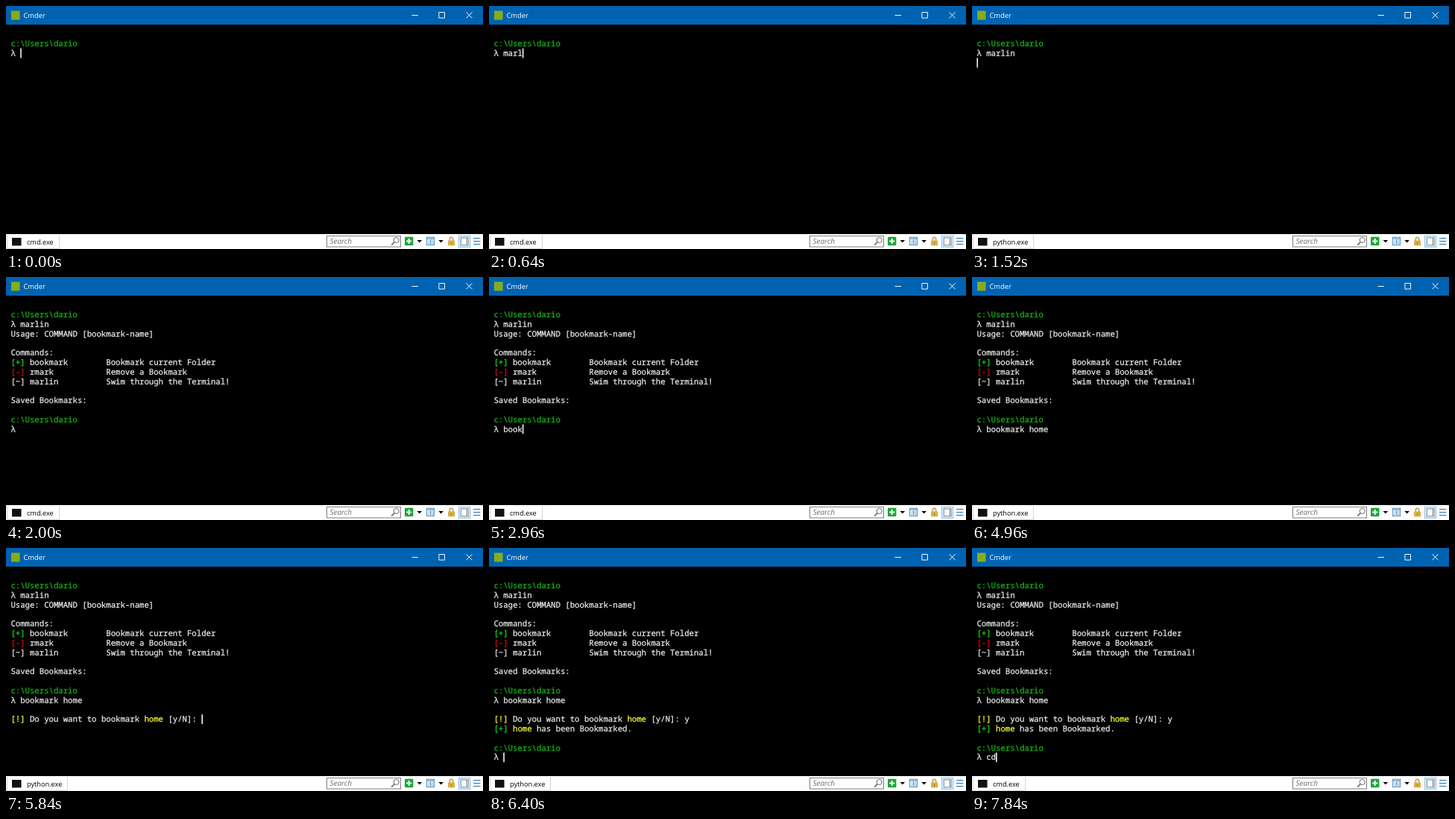
An HTML page for the animation above (8000 ms loop, 640 by 326 pixels).

```html
<!DOCTYPE html>
<html lang="en">
<head>
<meta charset="utf-8">
<title>Terminal bookmarks</title>
<style>
  html, body { margin: 0; width: 100%; height: 100%; overflow: hidden; background: #000; }
  svg { display: block; width: 100%; height: 100%; }
  text { white-space: pre; text-rendering: geometricPrecision; }
  .ui { font: 9.2px "Open Sans", "Noto Sans", sans-serif; }
  #rows { font: 10.667px "Noto Sans Mono", "DejaVu Sans Mono", monospace; color: #ececec; }
  #rows text, #rows tspan { fill: currentColor; stroke: currentColor; stroke-width: .25px; }
  .p { color: #14b814; }
  .g { color: #16e01c; }
  .r { color: #e00c0c; }
  .y { color: #ffff38; }
</style>
</head>
<body>
<svg viewBox="0 0 640 326" preserveAspectRatio="none">
  <defs>
    <linearGradient id="pane" x2="1" y2="1">
      <stop stop-color="#eaf4fc"/><stop offset="1" stop-color="#a9cdea"/>
    </linearGradient>
  </defs>
  <rect width="640" height="326"/>

  <!-- title bar -->
  <rect width="640" height="25" fill="#0063b1"/>
  <rect x="7" y="6.5" width="11.5" height="12" fill="#86ad1c"/>
  <text class="ui" x="23.4" y="16" fill="#fff" style="font-size:9.4px">Cmder</text>
  <path d="M544.5 12.5h8.5M580.9 8.5h7.6v7.6h-7.6zM617.5 8.3l8 8M625.5 8.3l-8 8" fill="none" stroke="#fff" stroke-width=".95"/>

  <!-- status bar -->
  <rect y="306" width="640" height="20" fill="#fff"/>
  <path id="edge" fill="none" stroke="#d6d6d6"/>
  <rect x="8" y="311" width="12.5" height="10.5" fill="#111"/>
  <text class="ui" id="tab" x="28" y="320" fill="#000"></text>

  <rect x="430.5" y="308.5" width="99" height="14.6" fill="#fff" stroke="#7c7c7c"/>
  <text class="ui" x="434.5" y="319.2" fill="#6e6e6e" style="font-style:italic;font-size:10px">Search</text>
  <g fill="none" stroke="#666">
    <circle cx="523.7" cy="314" r="3.6"/>
    <path d="M521.2 316.6l-4 4" stroke-width="1.5"/>
  </g>

  <rect x="535" y="309.8" width="11.4" height="11.4" rx="1" fill="#1ca637"/>
  <path d="M540.7 312v7M537.2 315.5h7" stroke="#fff" stroke-width="2"/>
  <path d="M551.5 314h6.6l-3.3 3.6zM580.3 314h6.6l-3.3 3.6z"/>
  <rect x="564.3" y="310.3" width="10.4" height="10.4" fill="url(#pane)" stroke="#5d92bd"/>
  <path d="M564 312h11M569.5 313.5v5" stroke="#5d92bd"/>
  <path d="M595.3 315v-2.4a2.2 2.4 0 0 1 4.4 0v2.4" fill="none" stroke="#bd9a4e" stroke-width="1.5"/>
  <rect x="593" y="314.6" width="9.2" height="7" rx=".8" fill="#d9b04a"/>
  <path d="M597.6 316.8v2.6" stroke="#8a6a1c"/>
  <rect x="607.3" y="308.3" width="15.6" height="15.2" fill="#d3eafa" stroke="#8cc6ec"/>
  <rect x="610.4" y="311" width="9.8" height="9.8" fill="#fff" stroke="#8a8a8a"/>
  <path d="M618.4 311v9.8" stroke="#9a9a9a" stroke-width="1.5"/>
  <path d="M627 311.6h9.4M627 315.6h9.4M627 319.6h9.4" stroke="#3a7fc2" stroke-width="1.4"/>

  <g id="rows"></g>
  <rect id="cursor" width="1.6" height="12.8" fill="#f4f4f4"/>
</svg>
<script>
const LOOP = 8000, LEFT = 6.4, TOP = 44.1, COL = 6.4, ROW = 12.8;
const $ = id => document.getElementById(id);
const PROMPT = "p:c:\\Users\\dario";

// [row, time shown, segments "class:text"]
const output = [
  [0, 0, PROMPT],
  [2, 1600, ":Usage: COMMAND [bookmark-name]"],
  [4, 1600, ":Commands:"],
  [5, 1600, "g:[+]", ": bookmark        Bookmark current Folder"],
  [6, 1600, "r:[-]", ": rmark           Remove a Bookmark"],
  [7, 1600, ":[~] marlin          Swim through the Terminal!"],
  [9, 1600, ":Saved Bookmarks:"],
  [11, 1680, PROMPT],
  [14, 5040, "y:[!]", ": Do you want to bookmark ", "y:home", ": [y/N]: "],
  [15, 6400, "g:[+]", ": ", "y:home", ": has been Bookmarked."],
  [17, 6400, PROMPT]
];

// typed lines: row, first column, time shown, fixed lead, text, key times
const typed = [
  { row: 1, col: 0, at: 0, lead: "λ ", text: "marlin", keys: [240, 400, 480, 640, 800, 960] },
  { row: 12, col: 0, at: 1680, lead: "λ ", text: "bookmark home",
    keys: [2480, 2640, 2800, 2880, 3040, 3200, 3280, 3440, 3760, 3920, 4080, 4160, 4320] },
  { row: 14, col: 40, at: 5040, lead: "", text: "y", keys: [5920] },
  { row: 18, col: 0, at: 6400, lead: "λ ", text: "cd", keys: [7680, 7840] }
];

// time, then the typed line holding the cursor, or a row it waits on, or nothing
const cursorSteps = [
  [0, { line: 0 }], [1280, { row: 2 }], [1600, null], [1680, { line: 1 }],
  [2000, null], [2480, { line: 1 }], [4560, { row: 13 }], [4960, null],
  [5040, { line: 2 }], [5440, null], [5840, { line: 2 }], [6320, { row: 15 }],
  [6400, { line: 3 }], [6880, null], [7280, { line: 3 }]
];

const tabSteps = [
  [0, "cmd.exe"], [1520, "python.exe"], [1680, "cmd.exe"],
  [4880, "python.exe"], [6480, "cmd.exe"]
];

function make(name, attrs, parent) {
  const el = document.createElementNS("http://www.w3.org/2000/svg", name);
  for (const key in attrs) el.setAttribute(key, attrs[key]);
  return parent.appendChild(el);
}

const addRow = (row, col = 0) =>
  make("text", { x: LEFT + col * COL, y: TOP + row * ROW + 9.9 }, $("rows"));

const stepAt = (steps, t) => steps.filter(s => s[0] <= t).pop()[1];
const show = (el, on) => el.setAttribute("visibility", on ? "visible" : "hidden");

const shown = output.map(([row, at, ...parts]) => {
  const el = addRow(row);
  for (const part of parts) {
    const cut = part.indexOf(":");
    make("tspan", { class: part.slice(0, cut) }, el).textContent = part.slice(cut + 1);
  }
  return { el, at };
});
for (const line of typed) line.el = addRow(line.row, line.col);

function draw(t) {
  for (const { el, at } of shown) show(el, t >= at);

  for (const line of typed) {
    const count = line.keys.filter(k => k <= t).length;
    const str = line.lead + line.text.slice(0, count);
    line.end = line.col + str.length;
    if (line.el.textContent !== str) line.el.textContent = str;
    show(line.el, t >= line.at);
  }

  const place = stepAt(cursorSteps, t);
  show($("cursor"), place);
  if (place) {
    const { row, end } = typed[place.line] || { row: place.row, end: 0 };
    $("cursor").setAttribute("x", LEFT + end * COL);
    $("cursor").setAttribute("y", TOP + row * ROW);
  }

  const name = stepAt(tabSteps, t);
  $("tab").textContent = name;
  $("edge").setAttribute("d", `M1.5 307V325.5H${name === "cmd.exe" ? 71.5 : 82.5}V307`);
}

const start = performance.now();
function tick(now) {
  draw(Math.max(0, now - start) % LOOP);
  requestAnimationFrame(tick);
}
draw(0);
requestAnimationFrame(tick);
</script>
</body>
</html>
```
